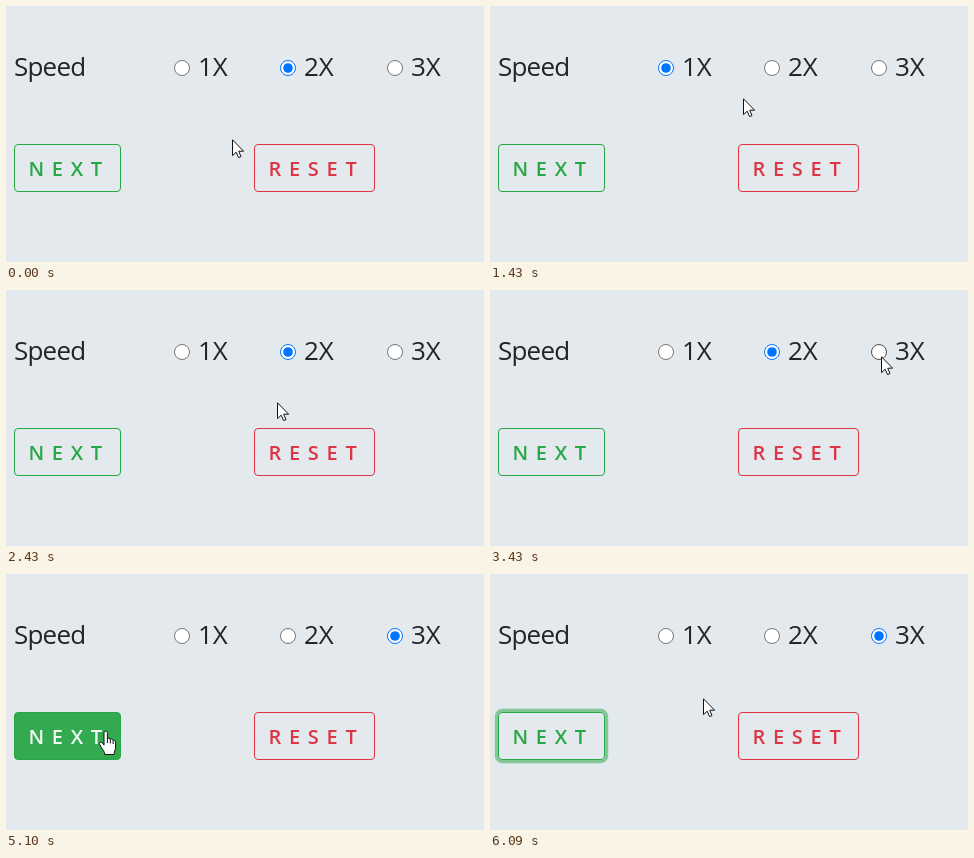
An HTML page for the animation above (6.19 s loop, 478x256 px).

```html
<!DOCTYPE html>
<html lang="en">
<head>
<meta charset="utf-8">
<title>Speed controls</title>
<style>
  html, body { margin: 0; width: 100%; height: 100%; overflow: hidden; background: #e4e9ed; }
  svg { display: block; width: 478px; height: 256px; }
  text { font-family: "Comic Sans MS", "Open Sans", sans-serif; font-weight: 500; }
  .label { font-size: 26px; fill: #212529; }
  .caption { font-size: 20px; font-weight: 600; letter-spacing: 7.7px; }
  .cursor { fill: #fff; stroke: #111; stroke-linejoin: round; }
</style>
</head>
<body>
<svg viewBox="0 0 478 256">
  <text class="label" x="8" y="70" letter-spacing="-.8">Speed</text>
  <g id="radios"></g>

  <rect id="ring" x="6.4" y="136.4" width="110.2" height="51.2" rx="5.6" fill="none" stroke="#28a745" stroke-width="3.2"/>
  <rect id="next" x="8.5" y="138.5" width="106" height="47" rx="3.5" fill="#28a745" stroke="#28a745"/>
  <text id="nextText" class="caption" x="22.5" y="170">NEXT</text>

  <rect x="248.5" y="138.5" width="120" height="47" rx="3.5" fill="none" stroke="#dc3545"/>
  <text class="caption" x="262.5" y="170" fill="#dc3545">RESET</text>

  <path id="arrow" class="cursor" d="M.5 .8V16.6L4.2 13.2 6.6 18.6 9 17.6 6.7 12.2H11.6Z"/>
  <g id="hand" class="cursor">
    <path d="M-3 1.8C-3-.4 .4-.4 .4 1.8V8C.8 6.6 3.2 6.8 3.3 8.6 3.9 7.4 6 7.8 6.1 9.6 7 8.8 8.6 9.3 8.6 11.2V16C8.6 18.6 7.4 19.8 7 23.5H-2.2C-2.4 20.5-4.2 18.8-5.6 16.6L-7.2 13.6C-8.2 11.6-5.8 10.6-4.6 12.2L-3 14.2Z"/>
    <path d="M.4 8V12M3.3 8.6V12.4M6.1 9.6V13" fill="none"/>
  </g>
</svg>
<script>
const LOOP = 6190;

// The picture refreshes every 100 ms, counted afresh from each of these times.
const RUNS = [0, 20, 930, 2050, 2330, 3450, 4300, 5040, 5490];

// Stops and turns of the pointer tip: time, x, y
const PATH = [
  [0, 226, 133], [800, 172, 63], [1000, 170, 65], [1200, 195, 113],
  [1430, 253, 92], [2000, 280, 62], [2250, 279, 66], [2430, 271, 112],
  [3430, 391, 66], [3600, 389, 69], [4400, 247, 125], [5140, 94, 158],
  [5440, 90, 158], [6090, 213, 124], [LOOP, 226, 133]
];

// Selected option from each time on
const PICKS = [[0, 1], [930, 0], [2050, 1], [3450, 2]];

const el = id => document.getElementById(id);
const set = (node, attrs) => {
  for (const key in attrs) node.setAttribute(key, attrs[key]);
  return node;
};
const add = (parent, tag, attrs) =>
  parent.appendChild(set(document.createElementNS("http://www.w3.org/2000/svg", tag), attrs));
const ramp = (t, start) => Math.min(1, Math.max(0, (t - start) / 150));

const radios = [176, 282, 389].map((x, i) => {
  const ring = add(el("radios"), "circle", { cx: x, cy: 62, r: 7.5, fill: "#fff" });
  const dot = add(el("radios"), "circle", { cx: x, cy: 62, r: 4.8 });
  add(el("radios"), "text", { class: "label", x: x + 16, y: 70 }).textContent = `${i + 1}X`;
  return { x, ring, dot };
});

function lastRefresh(t) {
  const start = RUNS.findLast(r => r <= t);
  return start + Math.floor((t - start) / 100) * 100;
}

// Smooth curve through the points that never swings past one of them.
function coordAt(t, axis) {
  const slope = i => PATH[i] && PATH[i + 1]
    ? (PATH[i + 1][axis] - PATH[i][axis]) / (PATH[i + 1][0] - PATH[i][0]) : 0;
  const tangent = i => {
    const a = slope(i - 1), b = slope(i);
    return a * b > 0 ? 2 * a * b / (a + b) : 0;
  };
  const i = PATH.findLastIndex(p => p[0] <= t);
  const span = PATH[i + 1][0] - PATH[i][0];
  const k = (t - PATH[i][0]) / span;
  const blend = k * k * (3 - 2 * k);
  return Math.round(
    PATH[i][axis] * (1 - blend) + PATH[i + 1][axis] * blend +
    span * k * (1 - k) * (tangent(i) * (1 - k) - tangent(i + 1) * k));
}

function draw(now) {
  const t = lastRefresh(now % LOOP);
  const x = coordAt(t, 1), y = coordAt(t, 2);
  const picked = PICKS.findLast(p => p[0] <= t)[1];

  radios.forEach((radio, i) => {
    const on = i === picked;
    const hover = Math.hypot(x - radio.x, y - 62) < 8;
    const color = on ? (hover ? "#005cc8" : "#0075ff") : (hover ? "#4f4f4f" : "#767676");
    set(radio.ring, { stroke: color });
    set(radio.dot, { fill: color, opacity: on ? 1 : 0 });
  });

  const fill = ramp(t, 4900) - ramp(t, 5590);
  const mix = (a, b) => Math.round(a + (b - a) * fill);
  set(el("next"), { "fill-opacity": fill });
  set(el("nextText"), { fill: `rgb(${mix(40, 255)},${mix(167, 255)},${mix(69, 255)})` });
  set(el("ring"), { opacity: ramp(t, 5240) * 0.5 });

  const overNext = x >= 8 && x < 115 && y >= 138 && y < 186;
  const transform = `translate(${x} ${y})`;
  set(el("arrow"), { transform, opacity: overNext ? 0 : 1 });
  set(el("hand"), { transform, opacity: overNext ? 1 : 0 });
}

const begin = performance.now();
function tick() {
  draw(performance.now() - begin);
  requestAnimationFrame(tick);
}
tick();
</script>
</body>
</html>
```
